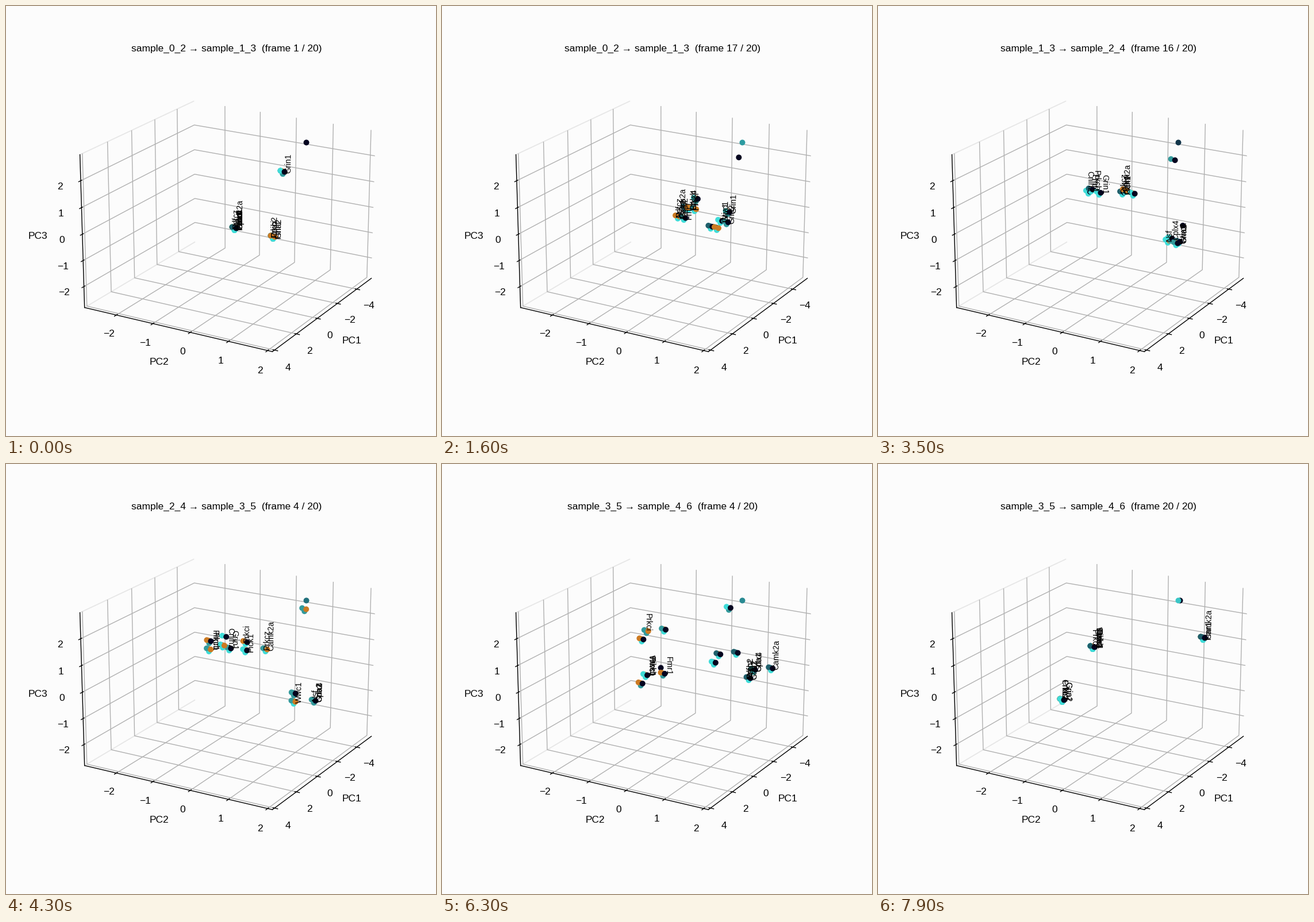
These frames come from a looping animation (748 px wide and 748 px high, 8000 ms). A matplotlib script:

```python
from itertools import product

import numpy as np
import matplotlib.pyplot as plt
from matplotlib.animation import FuncAnimation
from matplotlib.colors import to_rgb

SIZE, DPI, STEPS = 748, 125, 20
BG = "#fcfcfc"
plt.rcParams["font.family"] = "Liberation Sans"
fig = plt.figure(figsize=(SIZE / DPI, SIZE / DPI), dpi=DPI, facecolor=BG)

# Empty 3D box
box = fig.add_subplot(projection="3d", facecolor=BG)
box.view_init(elev=20, azim=30)
box.set(xlim=(-5.57, 4.19), ylim=(-2.89, 2.12), zlim=(-2.815, 2.96),
        xticks=range(-4, 5, 2), yticks=range(-2, 3), zticks=range(-2, 3),
        xlabel="PC1", ylabel="PC2", zlabel="PC3")
for axis, edge in ((box.xaxis, "none"), (box.yaxis, "#e6e6e6"), (box.zaxis, "none")):
    axis.pane.set(fill=False, alpha=1, edgecolor=edge)
title = box.set_title("", fontsize=10)

# Flat layer in pixels for dots and names
ax = fig.add_axes([0, 0, 1, 1], zorder=5)
ax.set(xlim=(0, SIZE), ylim=(SIZE, 0))
ax.axis("off")

# Cluster centres of each sample; the hub D never moves
D = (522, 237)
CENTRES = [
    dict(A=(397, 386), B=(464, 401), C=(481, 288), D=D),
    dict(A=(412, 362), B=(434, 344), C=(500, 371), E=(480, 383), D=D),
    dict(U=(353, 312), V=(428, 314), W=(528, 420), D=D),
    dict(X=(352, 285), Y=(350, 376), Z=(573, 365), T=(501, 333), D=D),
    dict(P=(373, 318), Q=(320, 410), R=(565, 302), D=D),
]
PARTS = len(CENTRES) - 1

# Every cluster feeds every next one, apart from these; hub flows have fewer dots
UNUSED = {"CE", "EU", "EV", "VT", "WT"}
HUB_FLOWS = [{"BD": 1}, {"DW": 1, "ED": 2}, {"UD": 2, "DT": 3}, {"YD": 1, "DP": 3}]

# Dots of one flow, front to back: right, left, lower, middle
OFFSETS = np.array([(3, 0), (-4, -2), (0, 3.5), (-1, -1)])
NAVY, DARK, TEAL, CYAN, ORANGE = (
    to_rgb(c) for c in ("#04041f", "#1f5f6b", "#339a9c", "#3fdcd8", "#cc7a22"))
SHADES = [[NAVY] * 7 + [ORANGE], [TEAL, CYAN, DARK, ORANGE],
          [CYAN, CYAN, TEAL], [ORANGE, ORANGE, DARK]]

# Names: route through the five samples, dot that carries the name
RIGHT, LEFT = OFFSETS[:2]
GENES = [("Camk2a", "AAVZR", RIGHT), ("Grin1", "CCUZQ", RIGHT),
         ("Prkci", "BBVXP", LEFT), ("Pick1", "AAVYP", RIGHT),
         ("Wwc1", "ACWYP", RIGHT), ("Gria2", "BCWZQ", RIGHT),
         ("Nsf", "AAWZQ", LEFT), ("Prkcz", "AAVZQ", LEFT),
         ("Cplx4", "ABWZP", RIGHT), ("Fmr1", "BAUYR", RIGHT),
         ("Prkcb", "ABUYP", RIGHT), ("Cnih2", "BAUZQ", LEFT),
         ("Gria1", "ACWZP", RIGHT)]


def make_flows(t, rng):
    """List of (start, end, dot colours) between two samples."""
    flows = dict(HUB_FLOWS[t])
    for a, b in product(CENTRES[t], CENTRES[t + 1]):
        if "D" not in a + b and a + b not in UNUSED:
            flows[a + b] = len(OFFSETS)
    return [(a, b, [s[rng.integers(len(s))] for s in SHADES[:n]])
            for (a, b), n in flows.items()]


rng = np.random.default_rng(4)
FLOWS = [make_flows(t, rng) for t in range(PARTS)]


def between(t, a, b, f):
    p, q = np.array(CENTRES[t][a]), np.array(CENTRES[t + 1][b])
    return p + (q - p) * f


def hub_color(i):
    level = np.interp(i, [0, 16, 28, 43, 54, 71, 79], [0, 0.7, 0, 0.5, 0.7, 0.55, 0.9])
    return tuple(np.array(NAVY) * (1 - level) + np.array(CYAN) * level)


dots = ax.scatter([], [], s=33, linewidths=0)
tags = [ax.text(0, 0, name, fontsize=8, ha="left", va="baseline", zorder=6)
        for name, _, _ in GENES]


def draw(i):
    t, k = divmod(i, STEPS)
    f = k / (STEPS - 1)
    title.set_text(f"sample_{t}_{t + 2} \u2192 sample_{t + 1}_{t + 3}"
                   f"  (frame {k + 1} / {STEPS})")
    pts, cols = [], []
    for a, b, shades in FLOWS[t]:
        c = between(t, a, b, f)
        for off, shade in list(zip(OFFSETS, shades))[::-1]:
            pts.append(c + off + 0.5)
            cols.append(shade)
    dots.set_offsets(pts + [np.add(D, 0.5)])
    dots.set_facecolor(cols + [hub_color(i)])

    # Names follow the leaning verticals and stay upright
    for tag, (_, route, off) in zip(tags, GENES):
        x, y = between(t, route[t], route[t + 1], f) + off
        lean = (x - 391.2) / 180
        tag.set_position((x, y))
        tag.set_rotation((-90 if lean < 0 else 90) - lean)
    return [title, dots, *tags]


anim = FuncAnimation(fig, draw, frames=STEPS * PARTS, interval=100,
                     repeat=True, repeat_delay=0)
plt.show()
```
